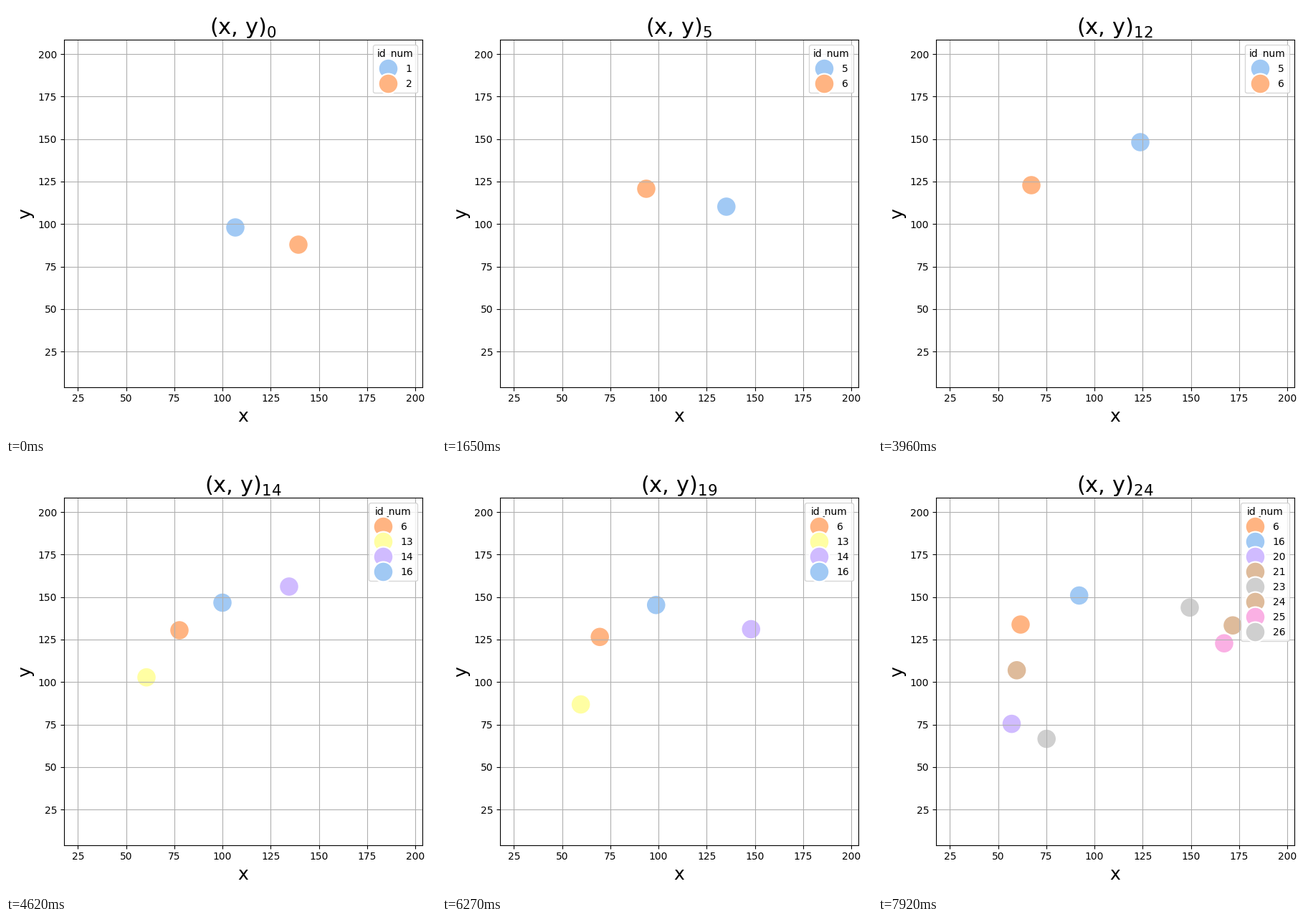
A matplotlib script that plays this animation: 600x600 px, repeating every 8000 ms.

```python
import matplotlib.pyplot as plt
import numpy as np
from matplotlib.animation import FuncAnimation
from matplotlib.lines import Line2D

SIZE, DPI = 600, 100
LOOP, TICK, HOLD = 8000, 40, 330

# pixel box of the axes (y up) and scale of the data
LEFT, BOTTOM, RIGHT, TOP = 80.88, 68.28, 580.75, 552.67
X25, DX = 100.3, 67.25 / 25
Y25, DY = 600 - 482.2, 59.3 / 25

BLUE, ORANGE, YELLOW = "#A1C9F4", "#FFB482", "#FFFEA3"
PURPLE, BROWN, PINK, GREY = "#D0BBFF", "#DEBB9B", "#FAB0E4", "#CFCFCF"


class Track:
    """A dot gliding between a few stage points (step, x, y)."""

    def __init__(self, num, colour, first, last, *keys, lost=None):
        self.num, self.colour = num, colour
        self.first, self.last, self.lost = first, last, lost
        self.steps, self.xs, self.ys = zip(*keys)

    def visible(self, step):
        return self.first <= step <= self.last and step != self.lost

    def at(self, step):
        return to_data(np.interp(step, self.steps, self.xs),
                       np.interp(step, self.steps, self.ys))


def to_data(px, py):
    return 25 + (px - X25) / DX, 25 + (SIZE - py - Y25) / DY


TRACKS = [
    Track(1, BLUE, 0, 3, (0, 320, 309), (3, 390, 317), lost=1),
    Track(2, ORANGE, 0, 2, (0, 408, 333), (2, 237, 262), lost=1),
    Track(3, BLUE, 1, 1, (1, 398, 300)),
    Track(4, ORANGE, 1, 1, (1, 291, 281)),
    Track(5, BLUE, 4, 12, (4, 393, 317), (5, 396.8, 280), (7, 417, 242),
          (9, 384.6, 209.8), (12, 366, 190), lost=6),
    Track(6, ORANGE, 3, 24, (3, 289, 268), (5, 285, 255), (9, 236.3, 223.3),
          (12, 214, 250), (14, 242, 232), (17, 221.2, 249.3),
          (22, 218.7, 229.3), (24, 199, 224)),
    Track(13, YELLOW, 13, 22, (13, 168, 318), (14, 196, 297.7),
          (17, 201.3, 316), (22, 182.2, 364.7), lost=15),
    Track(14, PURPLE, 14, 22, (14, 395, 171), (17, 387.8, 207.5),
          (20, 453, 242), (22, 453, 259.3)),
    Track(16, BLUE, 14, 24, (14, 302, 193.5), (17, 287, 201.2),
          (22, 316.4, 190), (24, 280.7, 183.5)),
    Track(20, PURPLE, 23, 24, (23, 174, 364), (24, 186.5, 362.6)),
    Track(21, BROWN, 23, 24, (24, 193.6, 287.8)),
    Track(23, GREY, 23, 24, (24, 435, 200.3)),
    Track(24, BROWN, 23, 24, (24, 495, 225.2)),
    Track(25, PINK, 24, 24, (24, 483, 250.2)),
    Track(26, GREY, 24, 24, (24, 235.2, 383.5)),
]


def handle(colour):
    return Line2D([], [], ls="", marker="o", ms=20, mfc=colour, mec="white", mew=1.6)


fig = plt.figure(figsize=(SIZE / DPI, SIZE / DPI), dpi=DPI, facecolor="white")
ax = fig.add_axes([LEFT / SIZE, BOTTOM / SIZE,
                   (RIGHT - LEFT) / SIZE, (TOP - BOTTOM) / SIZE])
x0, y0 = to_data(LEFT, SIZE - BOTTOM)
x1, y1 = to_data(RIGHT, SIZE - TOP)
ax.set(xlim=(x0, x1), ylim=(y0, y1))
ax.set_xticks(range(25, 201, 25))
ax.set_yticks(range(25, 201, 25))
ax.grid(True)
ax.set_xlabel("x", fontsize=18)
ax.set_ylabel("y", fontsize=18)
title = ax.set_title("", fontsize=22)
dots = ax.scatter([], [], s=400, edgecolors="white", linewidths=1.6)


def update(i):
    step = (i * TICK + TICK - 1) // HOLD
    shown = [t for t in TRACKS if t.visible(step)]
    dots.set_offsets([t.at(step) for t in shown])
    dots.set_facecolors([t.colour for t in shown])
    title.set_text(f"(x, y)$_{{{step}}}$")
    ax.legend([handle(t.colour) for t in shown], [t.num for t in shown],
              title="id_num", loc="upper right")
    return dots, title


anim = FuncAnimation(fig, update, frames=LOOP // TICK, interval=TICK,
                     repeat=True, repeat_delay=0, blit=False)
plt.show()
```
